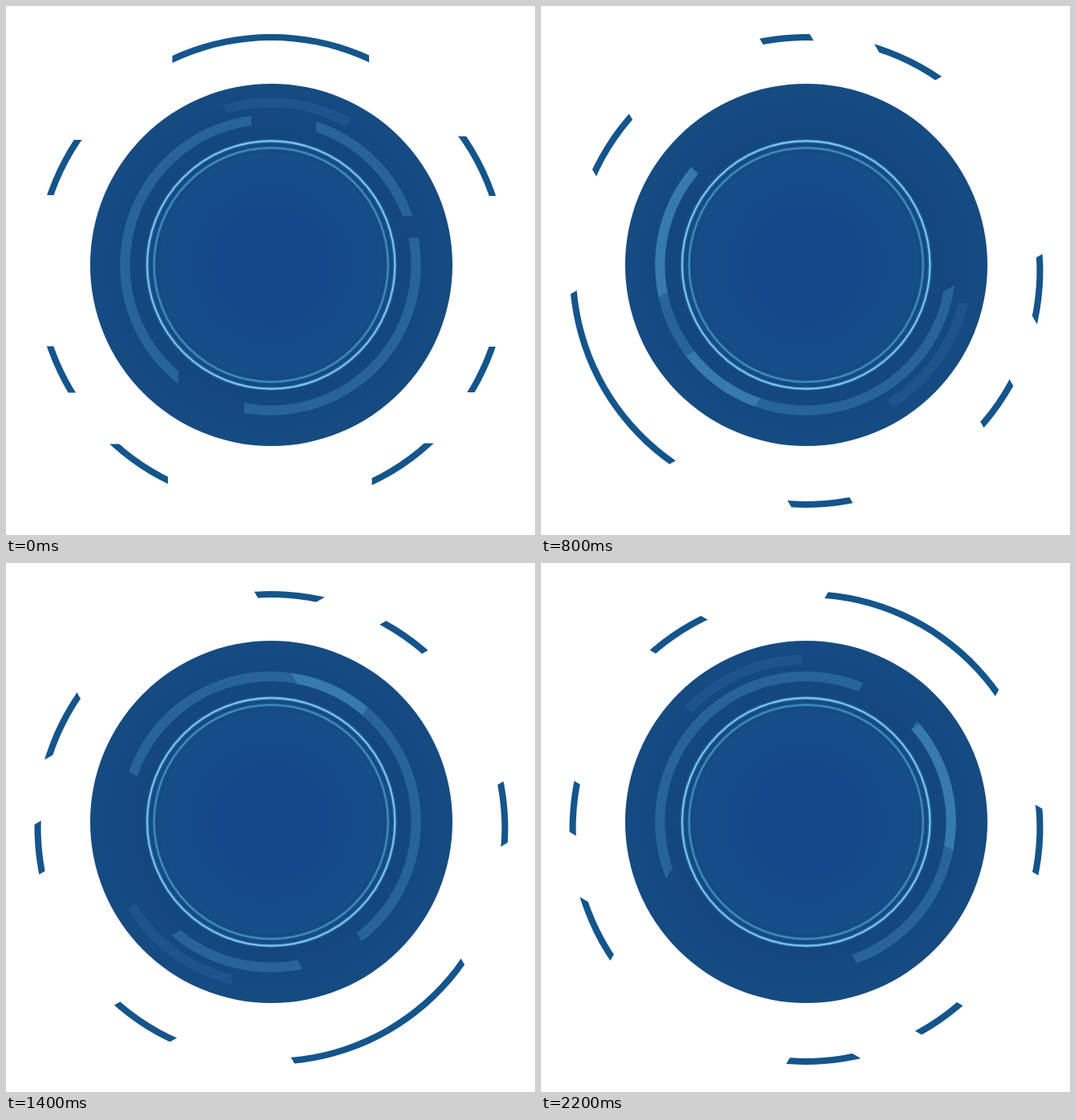
Animation, 660 px wide and 660 px high, one loop 2.27 s. Source, as an HTML page with a canvas:

```html
<!DOCTYPE html>
<html lang="en">
<head>
<meta charset="utf-8">
<title>Rotating dial</title>
<style>
  html, body { margin: 0; width: 100%; height: 100%; overflow: hidden; background: #fff; }
  canvas { display: block; width: 660px; height: 660px; }
</style>
</head>
<body>
<canvas id="stage" width="660" height="660"></canvas>
<script>
const ctx = document.getElementById('stage').getContext('2d');
const LOOP = 2270, STEP = 100, TURN = Math.PI / 12;
const TAU = Math.PI * 2;

const box = (x0, y0, x1, y1) => [[x0, y0], [x1, y0], [x1, y1], [x0, y1]];

// Each band is a ring cut to the given shapes; dir is its spin direction.
const bands = [
  { x: 331, y: 330.5, inner: 287.4, outer: 295.5, dir: -1, fill: '#14558c', cuts: [
    box(207.5, 0, 453, 200),
    box(0, 167, 331, 236), box(331, 162.5, 660, 237),
    box(0, 424.5, 331, 482.5), box(331, 425, 660, 482),
    box(0, 546.5, 202, 660), box(456.5, 545.5, 660, 660)
  ] },
  { x: 330, y: 323, inner: 175.5, outer: 187.7, dir: -1, fill: 'rgba(116,209,255,.2)', cuts: [
    [[100, 90], [306, 90], [306, 323], [215, 323], [215, 560], [100, 560]],
    box(387, 90, 560, 262)
  ] },
  { x: 330, y: 323, inner: 175.5, outer: 187.7, dir: 1, fill: 'rgba(116,209,255,.2)', cuts: [
    [[330, 289], [560, 289], [560, 560], [297, 560], [297, 323], [330, 323]]
  ] },
  { x: 330, y: 323, inner: 196.5, outer: 208.5, dir: 1, fill: 'rgba(116,209,255,.075)', cuts: [
    [[294, 165], [254, 95], [456, 95], [412, 172]]
  ] }
];

function drawBand(b, angle) {
  ctx.save();
  ctx.translate(b.x, b.y);
  ctx.rotate(angle * b.dir);
  ctx.translate(-b.x, -b.y);
  ctx.beginPath();
  for (const cut of b.cuts) {
    cut.forEach(([x, y], i) => i ? ctx.lineTo(x, y) : ctx.moveTo(x, y));
    ctx.closePath();
  }
  ctx.clip();
  ctx.beginPath();
  ctx.arc(b.x, b.y, b.outer, 0, TAU);
  ctx.arc(b.x, b.y, b.inner, TAU, 0, true);
  ctx.fillStyle = b.fill;
  ctx.fill();
  ctx.restore();
}

function disc(x, y, r, stops) {
  const g = ctx.createRadialGradient(x, y, 0, x, y, r);
  for (const [at, color] of stops) g.addColorStop(at / r, color);
  ctx.fillStyle = g;
  ctx.beginPath();
  ctx.arc(x, y, r, 0, TAU);
  ctx.fill();
}

function ring(r, width, color) {
  ctx.lineWidth = width;
  ctx.strokeStyle = color;
  ctx.beginPath();
  ctx.arc(330.7, 323, r, 0, TAU);
  ctx.stroke();
}

function draw(angle) {
  ctx.clearRect(0, 0, 660, 660);
  drawBand(bands[0], angle);
  disc(331, 323, 226, [[0, '#14478a'], [70, '#14488a'], [138, '#164e89'],
    [143, '#174a7d'], [150, '#174a7f'], [156, '#15477c'], [170, '#144780'],
    [200, '#154982'], [226, '#164b82']]);
  for (const b of bands.slice(1)) drawBand(b, angle);
  ring(146, 4.5, 'rgba(60,140,205,.25)');
  ring(146, 2, '#3d8dca');
  ring(154.6, 5, 'rgba(80,165,230,.3)');
  ring(154.6, 2.1, '#7cc6f7');
}

const start = performance.now();
function tick() {
  const t = (performance.now() - start) % LOOP;
  draw(Math.floor(t / STEP) * TURN);
  requestAnimationFrame(tick);
}
tick();
</script>
</body>
</html>
```
